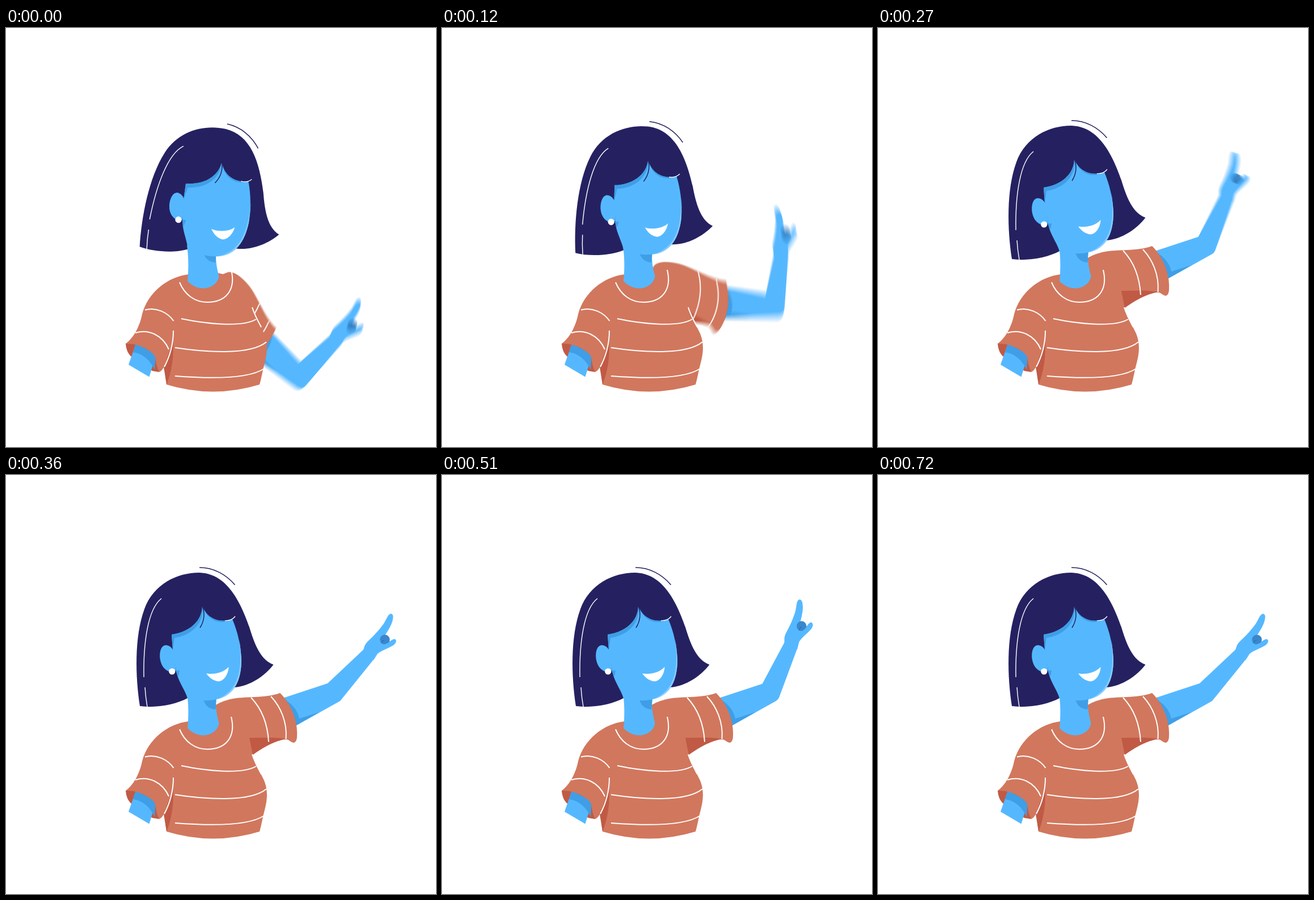
An HTML page with a canvas that plays this animation: 758x738 px, repeating every 900 ms.

```html
<!DOCTYPE html>
<html lang="en">
<head>
<meta charset="utf-8">
<title>Pointing woman</title>
<style>
html, body { margin: 0; width: 100%; height: 100%; overflow: hidden; background: #fff; }
canvas { display: block; }
</style>
</head>
<body>
<canvas id="stage" width="758" height="738"></canvas>
<script>
const W = 758, H = 738, LOOP = 900, STEP = 30, LAST = 720;
const SHUTTER = 0.5, SAMPLES = 12;
const C = {
  skin: '#55b8ff', skinDark: '#3f9ee6', skinLight: '#86ccff', palm: '#3a87cc',
  hair: '#252161', shirt: '#d1775d', shirtDark: '#c05a45', white: '#fff'
};

// Joint angles in degrees, one per step, relative to the final pose.
const UPPER = [65, 59, 49, 38.5, 28, 18.5, 10, 4, 0.8, 0];
const FORE = [1.6, -5, -15, -26, -35, -38.5, -37, -33, -27.5, -19.3, -9, -2, 0,
  -3.5, -8.5, -13.7, -17.3, -18.7, -18, -15, -10.8, -6.5, -3, -0.8, 0];
const HEAD_TILT = 12.2, HEAD_STEPS = 8;

const SHOULDER = [365.5, 450.5], ELBOW = [578, 382], HEAD = [337, 394.5];

const stage = document.getElementById('stage').getContext('2d');
const layer = document.createElement('canvas');
layer.width = W;
layer.height = H;
const g = layer.getContext('2d');

const rad = d => d * Math.PI / 180;
const clamp = (v, a, b) => Math.min(b, Math.max(a, v));

// Catmull-Rom through evenly spaced values; runs on a little before the first
function curve(list, x) {
  const end = list.length - 1;
  x = Math.min(x, end);
  const i = clamp(Math.floor(x), 0, end - 1), u = x - i;
  const at = k => k < 0 ? 2 * list[0] - list[1] : list[Math.min(k, end)];
  const [a, b, c, d] = [i - 1, i, i + 1, i + 2].map(at);
  return b + u / 2 * (c - a + u * (2 * a - 5 * b + 4 * c - d + u * (3 * (b - c) + d - a)));
}

function turn([x, y], [px, py], deg) {
  const c = Math.cos(rad(deg)), s = Math.sin(rad(deg)), dx = x - px, dy = y - py;
  return [px + dx * c - dy * s, py + dx * s + dy * c];
}

function cross([ax, ay], [bx, by], [cx, cy], [dx, dy]) {
  const ux = bx - ax, uy = by - ay, vx = dx - cx, vy = dy - cy;
  const k = ((cx - ax) * vy - (cy - ay) * vx) / (ux * vy - uy * vx);
  return [ax + ux * k, ay + uy * k];
}

function fill(d, color) {
  g.fillStyle = color;
  g.fill(new Path2D(d));
}

function line(d, color = C.white, width = 2) {
  g.strokeStyle = color;
  g.lineWidth = width;
  g.stroke(new Path2D(d));
}

function dot(x, y, r, color) {
  g.fillStyle = color;
  g.beginPath();
  g.arc(x, y, r, 0, 7);
  g.fill();
}

function rotated([x, y], deg, draw) {
  g.save();
  g.translate(x, y);
  g.rotate(rad(deg));
  g.translate(-x, -y);
  draw();
  g.restore();
}

function arm(up, fore) {
  const elbow = turn(ELBOW, SHOULDER, up);
  const u = p => turn(p, SHOULDER, up);
  const f = p => turn([p[0] - ELBOW[0] + elbow[0], p[1] - ELBOW[1] + elbow[1]], elbow, fore);
  const topHem = u([485, 394]), lowHem = u([510, 442]);
  const topWrist = f([632, 306]), lowWrist = f([649, 324]);
  const inner = cross(topHem, u([567, 367]), f([567, 367]), topWrist);
  const outer = cross(lowHem, u([589, 398]), f([589, 398]), lowWrist);
  g.fillStyle = C.skin;
  g.beginPath();
  g.moveTo(...topHem);
  g.lineTo(...inner);
  g.lineTo(...topWrist);
  g.lineTo(...lowWrist);
  g.arcTo(...outer, ...lowHem, 12);
  g.lineTo(...lowHem);
  g.fill();

  g.save();
  g.translate(elbow[0], elbow[1]);
  g.rotate(rad(fore));
  g.translate(-ELBOW[0], -ELBOW[1]);
  fill('M630 308C632 303 632 299 638 293C648 284 659 272 666 262C671 254 673 247 677 245C681 243 684 248 682 254C681 263 673 275 668 283C670 288 673 293 677 293C681 290 685 288 687 290C689 293 687 297 683 300C675 305 662 309 655 315L648 326Z', C.skin);
  dot(668, 290, 8.6, C.palm);
  fill('M661 300C669 299 677 294 681 291L683 299C675 305 667 307 659 311Z', C.skin);
  line('M661 296Q663 293 667 291', '#2b6fb0', 1);
  g.restore();

  rotated(SHOULDER, up, () => {
    fill('M488 393C503 402 514 413 517 429L553 417.500L510 442L484 400Z', C.skinDark);
    fill('M357 432L358 418C362 406 380 399 395 395C420 389 457 394 483 384C498 398 515 428 513 460C513 467 510 473 505 471C500 469 497 464 488 466C470 470 450 481 434 493L380 500Z', C.shirt);
    fill('M429 463C450 463 472 461 495 465C479 467 460 475 435 493Z', C.shirtDark);
    line('M432 392C449 410 461 434 463 470');
    line('M467 390C484 408 496 435 493.500 465');
  });
}

function torso() {
  fill('M211 556C212 568 216 575 222 580L258 604L270 606L266 572L230 550Z', C.shirtDark);
  fill('M229 556L264 577L252.500 614.500L216 593Z', C.skin);
  fill('M229 556L264 574L262 602C253 584 242 574 224 571Z', C.skinDark);
  fill('M320 434L372 431L400 438C414 448 424 470 434 492C438 506 446 519 455 538C462 556 461 571 456 590C452 605 450 618 447 628Q365 653 283 628L279 598L285 500Z', C.shirt);
  fill('M294 548C297 575 292 606 283 628L278 597Z', C.shirtDark);
  fill('M322 434C285 438 250 466 240 504C236 525 225 546 211 556C236 555 257 569 263 579C264 590 267 600 270 606C275 604 277 599 279 596L295 550L330 500Z', C.shirt);
  line('M295 533C295 558 289 578 279 597');
  line('M245 496.500C265 491 285 501 295.500 516');
  line('M228 537C252 530 276 541 287 566');
  line('M309 512C352 521 415 528 441 513');
  line('M298 563C350 571 430 577 459 553');
  line('M298 613C350 617 425 620 455 600');
  line('M434 492C438 505 444 516 450 527');
  line('M306 448C315 470 333 483 355 483C386 483 406 463 397 426');
}

function neck() {
  fill('M319 383L370 388C369 410 372 425 375.500 437C373 452 359 458.500 347 458.500C335 458 326 452 320 446C322 425 322 405 319 383Z', C.skin);
  fill('M347 393L371 393L369.500 413C359 412 351 408 347 393Z', C.skinDark);
}

function hairBack() {
  fill('M236 407C228 355 226 285 244 236C260 192 302 172 340 172C386 173 411 216 429 268C438 298 449 326 471.500 334C456 354 430 372 403 374L320 393C300 404 265 411 236 407Z', C.hair);
}

function face() {
  fill('M292 281C322 277 346 258 346 230C353 252 376 262 399 254C408 275 414 300 415 325C415 360 404 388 371 395C357 399 335 397 320 394C317 380 302 362 300 344L294 308Z', C.skin);
  fill('M411 290C417 340 412 380 371 395.500C404 388 415 360 415 325C414 312 413 300 411 290Z', C.skinLight);
  fill('M292 281C322 277 346 258 346 230C351 262 325 283 297 287L294 310Z', C.skinDark);
  fill('M346 230C353 252 376 262 399 254C382 264 356 261 346 230Z', C.skinDark);
  fill('M299 345L306 344L304 355Z', C.skinDark);
  fill('M296 312C293 303 286 299 280 300C272 302 270 315 272 326C274 338 283 347 293 347L300 344Z', C.skin);
  dot(292.7, 346, 5.6, C.white);
  fill('M353 349.500C366 352 384 348 392.500 338C392 352 383 364 374 363.500C364 362 358 356 353 349.500Z', C.white);
  line('M346 230C351 244 349 258 342 269', C.hair, 1.5);
  line('M386 256.500C395 257 400 254 404 249', C.white, 1.3);
  line('M274 217.500C250 236 242 295 243 356', C.white, 1.4);
  line('M245 374Q246 391 249 408', C.white, 1.4);
  line('M341 163C366 163 388 175 403.500 193.500', C.hair, 1.5);
}

function scene(time, tilt) {
  g.fillStyle = C.white;
  g.fillRect(0, 0, W, H);
  arm(curve(UPPER, time), curve(FORE, time));
  torso();
  rotated(HEAD, tilt, hairBack);
  neck();
  rotated(HEAD, tilt, face);
}

// The arm is averaged over an open shutter; the head stays crisp.
function render(step) {
  const tilt = HEAD_TILT * (1 - Math.min(1, step / HEAD_STEPS));
  for (let i = 0; i < SAMPLES; i++) {
    scene(step + SHUTTER * ((i + 0.5) / SAMPLES - 0.5), tilt);
    stage.globalAlpha = 1 / (i + 1);
    stage.drawImage(layer, 0, 0);
  }
}

const start = performance.now();
let shown = -1;

function tick() {
  const t = (performance.now() - start) % LOOP;
  const step = Math.floor(Math.min(t, LAST) / STEP);
  if (step !== shown) render(shown = step);
  requestAnimationFrame(tick);
}
tick();
</script>
</body>
</html>
```
